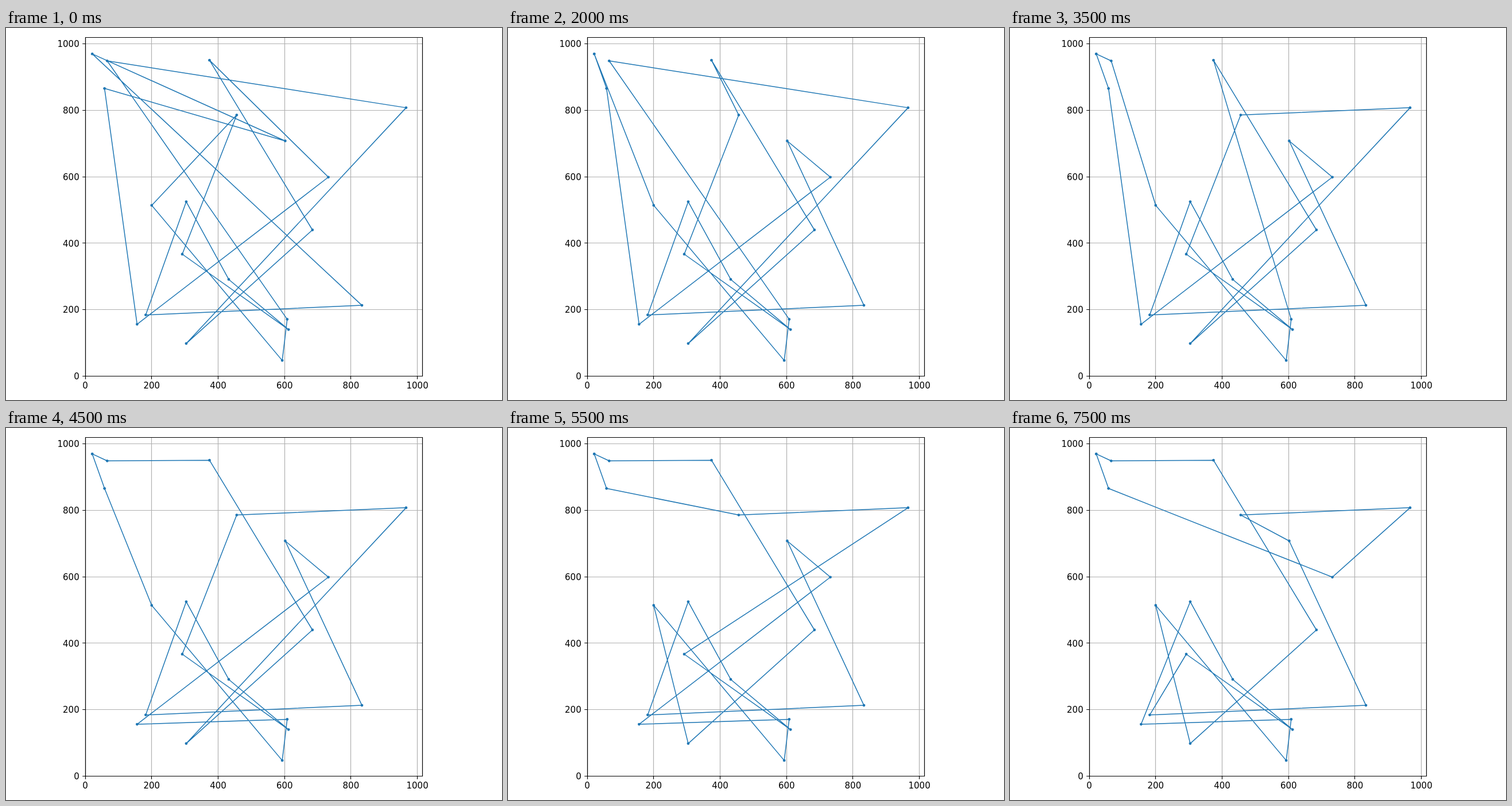
An HTML page that plays this animation: 864 by 648 pixels, repeating every 8 s.

```html
<!DOCTYPE html>
<html lang="en">
<head>
<meta charset="utf-8">
<title>2-opt tour</title>
<style>
  html, body { margin: 0; width: 100%; height: 100%; overflow: hidden; background: #fff; }
  svg { display: block; }
  text { font: 15px "DejaVu Sans", sans-serif; }
  path { fill: none; stroke: #000; stroke-width: 1.2; }
  .grid { stroke: #b0b0b0; }
  #tour { stroke: #1f77b4; stroke-width: 1.5; stroke-linejoin: round; }
  circle { fill: #1f77b4; }
</style>
</head>
<body>
<svg id="plot" width="864" height="648" viewBox="0 0 864 648"></svg>
<script>
const STEP = 500, SCALE = 0.5785;
const px = x => 138.1 + x * SCALE;
const py = y => 606.3 - y * SCALE;
const snap = v => Math.floor(v) + 0.5;

// Cities a, b, c, ... in data units
const cities = [
  [21, 970], [66, 949], [58, 866], [374, 951], [456, 786],
  [602, 708], [966, 808], [732, 599], [200, 514], [304, 525],
  [684, 440], [292, 367], [432, 291], [182, 184], [156, 156],
  [833, 213], [608, 171], [612, 140], [304, 98], [593, 47]
].map(([x, y]) => [px(x), py(y)]);

// Each 2-opt move reverses the stretch between two cities
const moves = "ch fc af di gd ib qi cq bc cs ge he cg lj oc".split(" ");
const tours = ["afcohdksgbqtielrmjnp"];
for (const [from, to] of moves) {
  const t = tours.at(-1), i = t.indexOf(from), j = t.indexOf(to) + 1;
  tours.push(t.slice(0, i) + [...t.slice(i, j)].reverse().join("") + t.slice(j));
}
const paths = tours.map(t =>
  "M" + [...t].map(c => cities[c.charCodeAt(0) - 97]).join("L") + "Z");

const left = snap(px(0)), right = snap(px(1016) - 0.3);
const top_ = snap(py(1020)), bottom = snap(py(0));
let grid = "", ticks = "", labels = "";
for (let v = 0; v <= 1000; v += 200) {
  const x = snap(px(v)), y = snap(py(v));
  grid += `M${x} ${top_}V${bottom}M${left} ${y}H${right}`;
  ticks += `M${x} ${bottom}v5.25M${left} ${y}h-5.25`;
  labels += `<text x="${px(v)}" y="628.4" text-anchor="middle">${v}</text>` +
    `<text x="127.7" y="${py(v) + 5.6}" text-anchor="end">${v}</text>`;
}

document.getElementById("plot").innerHTML =
  `<path class="grid" d="${grid}"/><path d="${ticks}"/><path id="tour"/>` +
  cities.map(([x, y]) => `<circle cx="${x}" cy="${y}" r="2.4"/>`).join("") +
  `<path d="M${left} ${top_}H${right}V${bottom}H${left}Z"/>` + labels;

const tour = document.getElementById("tour");
function draw() {
  tour.setAttribute("d", paths[Math.floor(performance.now() / STEP) % paths.length]);
  requestAnimationFrame(draw);
}
draw();
</script>
</body>
</html>
```
